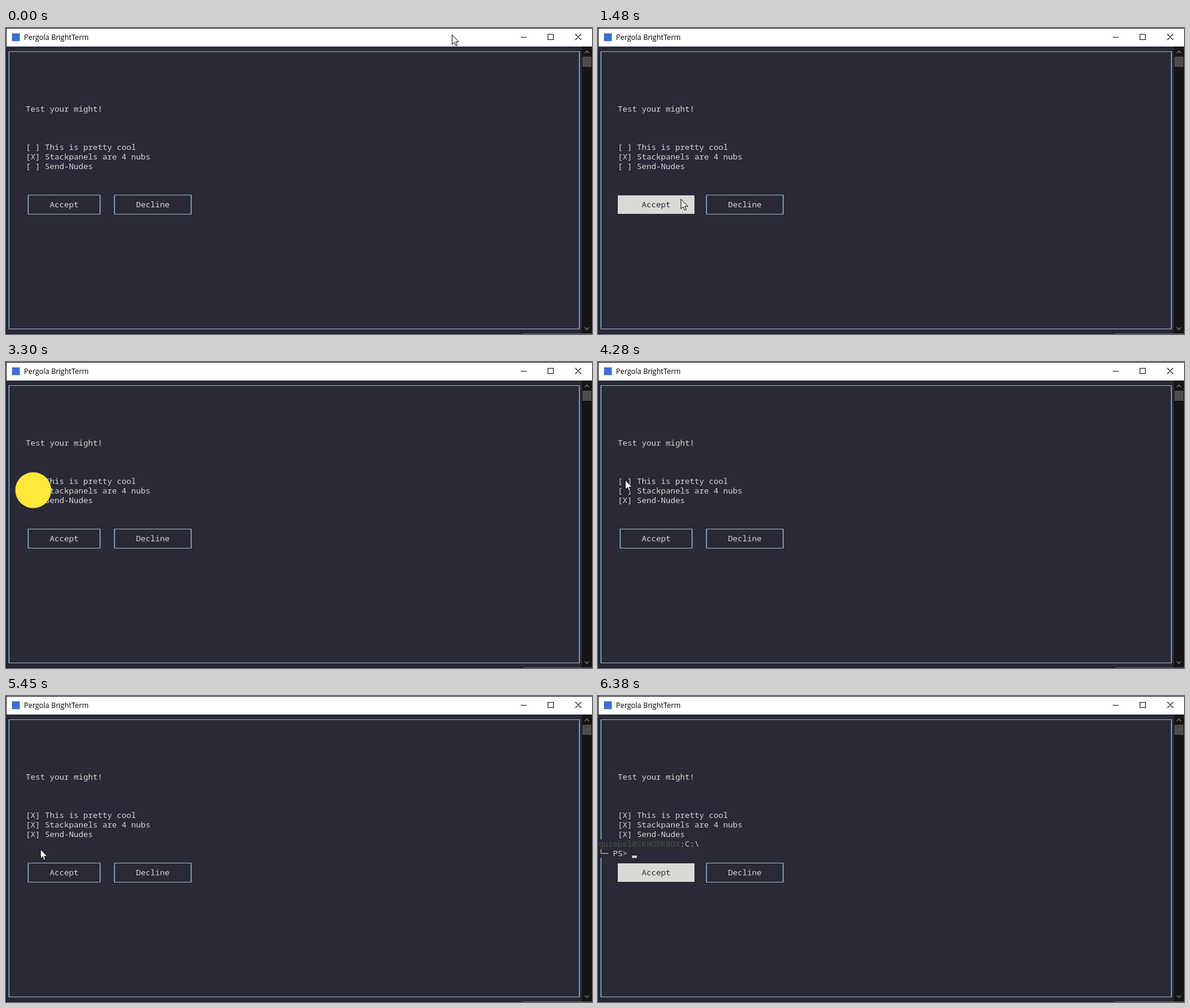
An HTML page that plays this animation: 978 by 512 pixels, repeating every 6530 ms.

```html
<!DOCTYPE html>
<html lang="en">
<head>
<meta charset="utf-8">
<title>Terminal form</title>
<style>
  html, body { margin: 0; width: 100%; height: 100%; overflow: hidden; background: #292937; }
  svg { display: block; width: 978px; height: 512px; }
  text { white-space: pre; }
  .mono { font: 13.333px "Noto Sans Mono", "DejaVu Sans Mono", monospace; }
  .title { font: 12px "Open Sans", "Noto Sans", sans-serif; }
</style>
</head>
<body>
<svg id="stage" viewBox="0 0 978 512"></svg>
<script>
const LOOP = 6530;
const BG = '#292937', FG = '#dad9d4';
const stage = document.getElementById('stage');

function add(tag, attrs, parent = stage) {
  const el = document.createElementNS('http://www.w3.org/2000/svg', tag);
  for (const key in attrs) el.setAttribute(key, attrs[key]);
  parent.appendChild(el);
  return el;
}
const rect = (x, y, width, height, fill, parent) => add('rect', { x, y, width, height, fill }, parent);
const path = (d, stroke, width = 1, parent) =>
  add('path', { d, stroke, 'stroke-width': width, fill: 'none' }, parent);
function text(x, y, str, fill = FG, parent, cls = 'mono') {
  const el = add('text', { x, y, fill, class: cls }, parent);
  el.textContent = str;
  return el;
}
// Upright lines fall between two pixels, so subpixel rendering tints each half
function frame(x1, y1, x2, y2, parent) {
  const g = add('g', {}, parent);
  rect(x1, y1, x2 - x1, 1, '#a9b2c4', g);
  rect(x1, y2, x2 - x1, 1, '#a9b2c4', g);
  for (const x of [x1, x2]) {
    rect(x - 1, y1, 1, y2 - y1 + 1, '#4a9fe4', g);
    rect(x, y1, 1, y2 - y1 + 1, '#a58c80', g);
  }
  return g;
}
const show = (el, on) => el.setAttribute('visibility', on ? 'visible' : 'hidden');

// Window
rect(0, 0, 978, 512, BG);
rect(0, 0, 978, 1, '#1b1530');
rect(0, 0, 1, 512, '#1a1524');
rect(1, 1, 977, 30, '#fff');
rect(10, 9, 13, 13, '#3c70d6');
text(30, 20, 'Pergola BrightTerm', '#000', stage, 'title');
path('M859 15.5H869M904.5 10.5H913.5V19.5H904.5ZM950 10L960 20M960 10L950 20', '#111', 1.1);

// Scroll bar
rect(961, 31, 17, 481, '#151517');
rect(962, 48, 15, 17, '#4d4d4f');
path('M966 42L969.5 38.5L973 42', '#777', 1.5);
path('M966 501L969.5 504.5L973 501', '#777', 1.5);
rect(0, 511, 863, 1, '#1b1726');
rect(863, 511, 115, 1, '#5c5b6c');

// Form
frame(5, 39, 957, 503);
text(33, 140, 'Test your might!');

const boxes = ['This is pretty cool', 'Stackpanels are 4 nubs', 'Send-Nudes'].map((label, i) => {
  const y = 192 + 16 * i;
  const back = rect(33, y - 1, 24, 16, FG);
  text(65, y + 12, label);
  return { back, mark: text(33, y + 12, '') };
});

function button(x1, x2, label, labelX) {
  const border = frame(x1, 279, x2, 311);
  const back = rect(x1 - 4, 280, x2 - x1 + 8, 31, FG);
  return { border, back, label: text(labelX, 300, label) };
}
const accept = button(37, 157, 'Accept', 73);
const decline = button(181, 309, 'Decline', 217);

// Shell prompt after the form closes
const prompt = add('g', {});
rect(1, 240, 8, 31, BG, prompt);
text(1, 252, 'quimbel@ZKWORKBOX', '#43583f', prompt);
text(137, 252, ':C:\\', FG, prompt);
path('M5 256V263.5H17', FG, 1, prompt);
text(25, 268, 'PS>', FG, prompt);
rect(57, 267, 8, 4, FG, prompt);

const pointer = add('path', {
  d: 'M.5 .5V16.5L4.2 13L6.8 18.8L9.2 17.8L6.7 12.2H11.8Z',
  fill: '#fff', stroke: '#000', 'stroke-width': 1
});
const halo = add('circle', { r: 30, fill: '#ffe83a' });

// Pointer moves: start, end, target x, target y
const moves = [
  [50, 690, 268, 291],
  [1020, 1480, 138, 286],
  [1740, 2360, 48, 233.5],
  [2940, 3240, 45, 214],
  [3840, 4030, 45, 197],
  [4560, 4880, 45, 212],
  [5300, 5590, 68, 295.5],
  [6060, 6370, 992, 128]
];
const clicks = [[2450, 2610], [3270, 3430], [4350, 4500], [5000, 5150], [5900, 6040]];
const within = (t, a, b) => t >= a && t < b;

function pointerAt(t) {
  let x = 744, y = 11;
  for (const [a, b, tx, ty] of moves) {
    if (t <= a) break;
    const u = Math.min(1, (t - a) / (b - a));
    const s = u * u * (3 - 2 * u);
    x += (tx - x) * s;
    y += (ty - y) * s;
  }
  return [Math.round(x), Math.round(y)];
}

function setButton(b, lit) {
  show(b.back, lit);
  show(b.border, !lit);
  b.label.setAttribute('fill', lit ? BG : FG);
}

function draw(t) {
  const [x, y] = pointerAt(t);
  const over = (x1, x2) => within(x, x1, x2) && within(y, 280, 312);
  const pressed = clicks.some(([a, b]) => within(t, a, b));

  const checked = [t >= 4400, t < 3320 || t >= 5050, t >= 2500];
  const lit = [
    within(t, 4310, 4400),
    within(t, 3120, 3320) || within(t, 4850, 5050),
    within(t, 2200, 2500)
  ];
  boxes.forEach((box, i) => {
    show(box.back, lit[i]);
    box.mark.textContent = checked[i] ? '[X]' : '[ ]';
    box.mark.setAttribute('fill', lit[i] ? '#36517c' : FG);
  });

  setButton(accept, over(33, 161) || t >= 5900);
  setButton(decline, over(177, 313) && t < 5900);
  show(prompt, t >= 6040);

  pointer.setAttribute('transform', `translate(${x} ${y})`);
  halo.setAttribute('cx', x + .5);
  halo.setAttribute('cy', y + .5);
  show(halo, pressed);
}

const start = performance.now();
function tick() {
  draw((performance.now() - start) % LOOP);
  requestAnimationFrame(tick);
}
draw(0);
requestAnimationFrame(tick);
</script>
</body>
</html>
```
